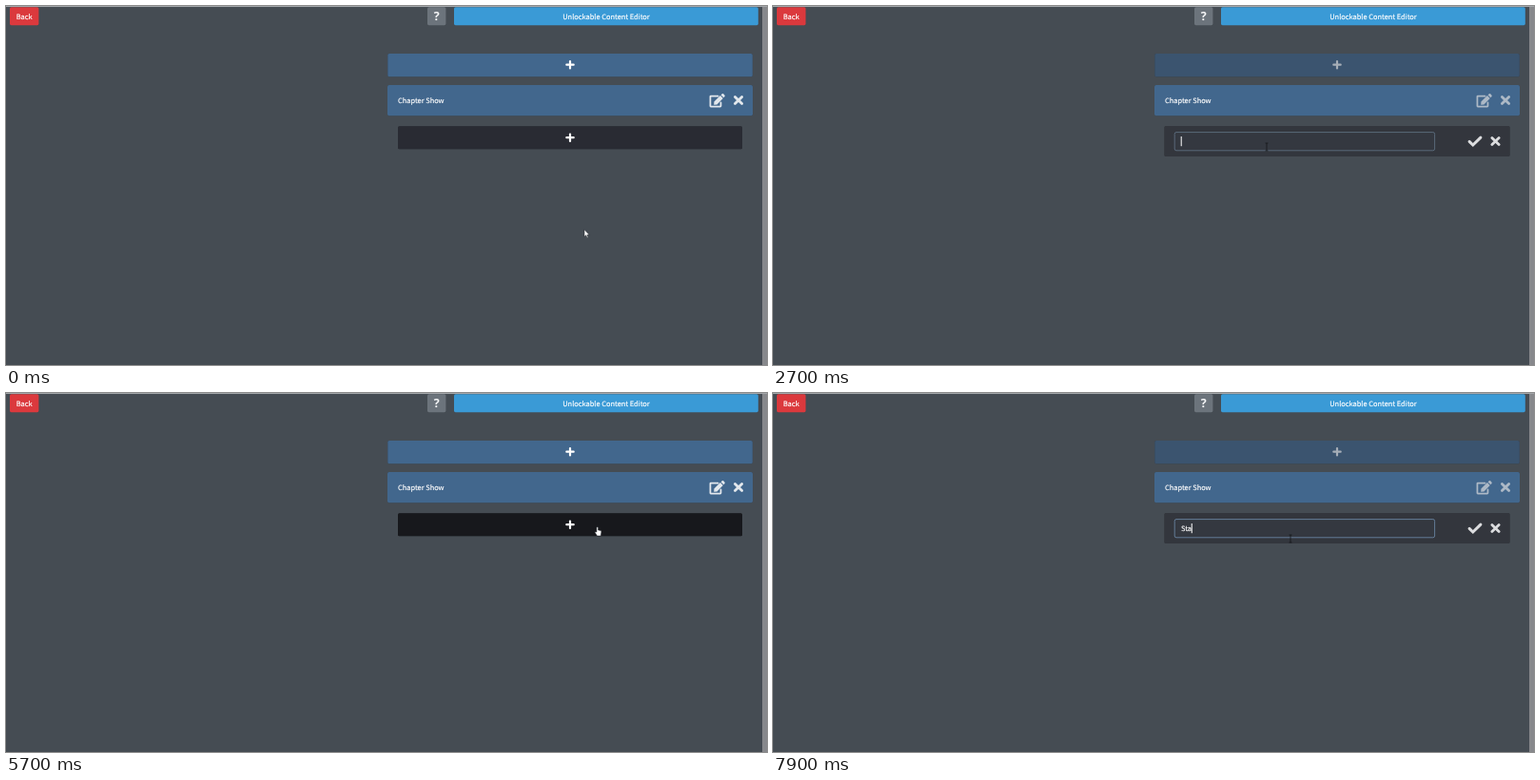
Animation, 800 px wide and 377 px high, one loop 8000 ms. Source, as an HTML page:

```html
<!DOCTYPE html>
<html lang="en">
<head>
<meta charset="utf-8">
<title>Unlockable Content Editor</title>
<style>
  html, body { margin: 0; width: 100%; height: 100%; overflow: hidden; background: #454c53; }
  svg { display: block; width: 800px; height: 377px; }
  text {
    font: 7.43px "Noto Sans CJK JP", "Noto Sans CJK SC", "Noto Sans", sans-serif;
    fill: #fff; stroke: #fff; stroke-width: .18; text-rendering: geometricPrecision;
  }
  .mid { text-anchor: middle; }
  .help { font: 800 12.5px "Noto Sans", "Open Sans", sans-serif; fill: #f4f5f6; stroke: none; }
  .card { filter: drop-shadow(0 .5px .6px rgba(0, 0, 0, .3)); }
  .line { fill: none; stroke: currentColor; }
</style>
</head>
<body>
<svg viewBox="0 0 800 377">
  <defs>
    <path id="plus" class="line" d="M-3.7 0H3.7M0-3.7V3.7" stroke-width="2.2" stroke-linecap="round"/>
    <path id="cross" class="line" d="M-3.6-3.6L3.6 3.6M3.6-3.6L-3.6 3.6" stroke-width="2.8" stroke-linecap="round"/>
    <path id="check" class="line" d="M-5.9.4L-2.2 4L5.9-3.9" stroke-width="3" stroke-linecap="round"/>
    <g id="edit">
      <path class="line" d="M9.8 3H1.6Q1 3 1 3.6V14.4Q1 15 1.6 15H12.4Q13 15 13 14.4V10.4" stroke-width="1.9" stroke-linecap="round"/>
      <path fill="currentColor" d="M12.4 2.5L15.5 5.6L8.6 12.7L5.1 13L5.3 9.5ZM13.2 1.8L14.4.6Q15.2-.1 16 .6L17.4 2Q18.1 2.8 17.4 3.6L16.2 4.8Z"/>
    </g>
  </defs>

  <rect width="800" height="377" fill="#454c53"/>
  <rect width="800" height="1" fill="#a3a6a9"/>
  <rect x="795" y="1" width="5" height="376" fill="#87888c"/>

  <rect x="4" y="1.2" width="30.4" height="19" rx="1.6" fill="#db393d"/>
  <text class="mid" x="19.2" y="13.7">Back</text>
  <rect x="443" y="1.2" width="19.4" height="19" rx="1.6" fill="#6c747c"/>
  <text class="help mid" x="452.8" y="15.3">?</text>
  <rect x="471" y="1.2" width="319.8" height="19" rx="1.6" fill="#3a9ad6"/>
  <text class="mid" x="631" y="13.7">Unlockable Content Editor</text>

  <rect id="addTop" class="card" x="401.3" y="50" width="383.5" height="24.3" rx="1.6"/>
  <use id="plusTop" href="#plus" x="593" y="61.7"/>
  <rect class="card" x="401" y="83" width="384" height="32.2" rx="1.6" fill="#42678d"/>
  <text x="412" y="101.8">Chapter Show</text>
  <g id="tools">
    <use href="#edit" transform="translate(739.5 91.8) scale(.92)"/>
    <use href="#cross" x="770" y="99"/>
  </g>

  <g id="closed" color="#fff">
    <rect id="addSub" class="card" x="412" y="126.3" width="362" height="24" rx="1.6"/>
    <use href="#plus" x="593" y="138.2"/>
  </g>

  <g id="open" color="#dcdddf">
    <rect class="card" x="411.5" y="126" width="363" height="32" rx="1.6" fill="#33363d"/>
    <rect id="field" x="422.2" y="132.6" width="273.4" height="19.2" rx="1.8" fill="#343840" stroke-width=".8"/>
    <text id="typed" x="429" y="145.1"></text>
    <rect id="caret" y="137" width="1" height="10.2" fill="#fff"/>
    <use id="ok" href="#check" x="738" y="142"/>
    <use href="#cross" x="759.5" y="142"/>
  </g>

  <g id="pointer">
    <path id="arrow" d="M-2-4.5V2.9L-.3 1.4L.9 4.1L2 3.6L.9 1H3.2Z" fill="#fff" stroke="#20242a" stroke-width=".5"/>
    <path id="hand" d="M-1.7-4.3Q-.9-5.1-.1-4.3V-1.5L2.6-.8Q3.4-.5 3.3.4L2.6 4.6H-1.2L-3.4 1Q-3.4-.2-1.7.6Z" fill="#fff" stroke="#20242a" stroke-width=".5"/>
    <path id="beam" class="line" d="M-1.5-4H1.5M0-4V4M-1.5 4H1.5" color="#15171a" stroke-width=".8"/>
  </g>
</svg>
<script>
const LOOP = 8000, STEP = 100;
const $ = id => document.getElementById(id);
const clamp = v => Math.max(0, Math.min(1, v));
const within = (t, spans) => spans.find(([a, b]) => t >= a && t < b);
const show = (id, on) => $(id).setAttribute('display', on ? 'inline' : 'none');
const mix = (a, b, k) => `rgb(${a.map((v, i) => Math.round(v + (b[i] - v) * k))})`;

// time, x, y of the pointer's centre
const path = [
  [0, 610, 239.3], [400, 610, 239.3], [500, 598, 237], [900, 523, 142],
  [2200, 523, 142], [2600, 519, 148], [3400, 519, 148], [4200, 744.6, 143],
  [4300, 744.6, 143], [4600, 760, 142], [5200, 760, 142], [6000, 559, 147],
  [6200, 559, 147], [6700, 544, 153], [LOOP, 544, 153]
];
const editing = [[2600, 4800], [6100, LOOP]];
const hovering = [[800, 2600], [4800, 6100]];
const caretOn = [[2700, 3200], [3700, 4200], [6200, 6700], [7200, LOOP]];

function pointerAt(t) {
  const i = path.findIndex(p => p[0] > t);
  const [t0, x0, y0] = path[i - 1], [t1, x1, y1] = path[i];
  let k = (t - t0) / (t1 - t0);
  k = k * k * (3 - 2 * k);
  return [x0 + (x1 - x0) * k, y0 + (y1 - y0) * k];
}

function render(t) {
  const edit = within(t, editing), hover = within(t, hovering);
  const [x, y] = pointerAt(t);

  $('addTop').setAttribute('fill', edit ? '#3b546f' : '#42678d');
  $('plusTop').setAttribute('color', edit ? '#a6aeb7' : '#fff');
  $('tools').setAttribute('color', edit ? '#adb9c6' : '#e3e8ed');
  show('closed', !edit);
  show('open', edit);

  const dark = hover ? clamp((t - hover[0]) / 200) : 0;
  $('addSub').setAttribute('fill', mix([41, 43, 51], [23, 24, 28], dark));

  const focus = edit ? clamp((t - edit[0]) / 200) : 0;
  $('field').setAttribute('stroke', mix([88, 94, 101], [112, 142, 174], focus));
  const count = Math.max(0, Math.floor((t - 7600) / 100));
  $('typed').textContent = 'Sta'.slice(0, count);
  $('caret').setAttribute('x', 428.7 + (count ? $('typed').getComputedTextLength() : 0));
  show('caret', within(t, caretOn));

  const onOk = edit && x > 731 && x < 749;
  $('ok').setAttribute('color', onOk ? '#fff' : '#dcdddf');
  const beam = edit && x < 696;
  const hand = edit ? x > 731 : y < 155;
  show('beam', beam);
  show('hand', hand);
  show('arrow', !beam && !hand);
  $('pointer').setAttribute('transform', `translate(${x} ${y})`);
}

const start = performance.now();
function tick() {
  const t = (performance.now() - start) % LOOP;
  render(Math.floor(t / STEP) * STEP);
  requestAnimationFrame(tick);
}
tick();
</script>
</body>
</html>
```
